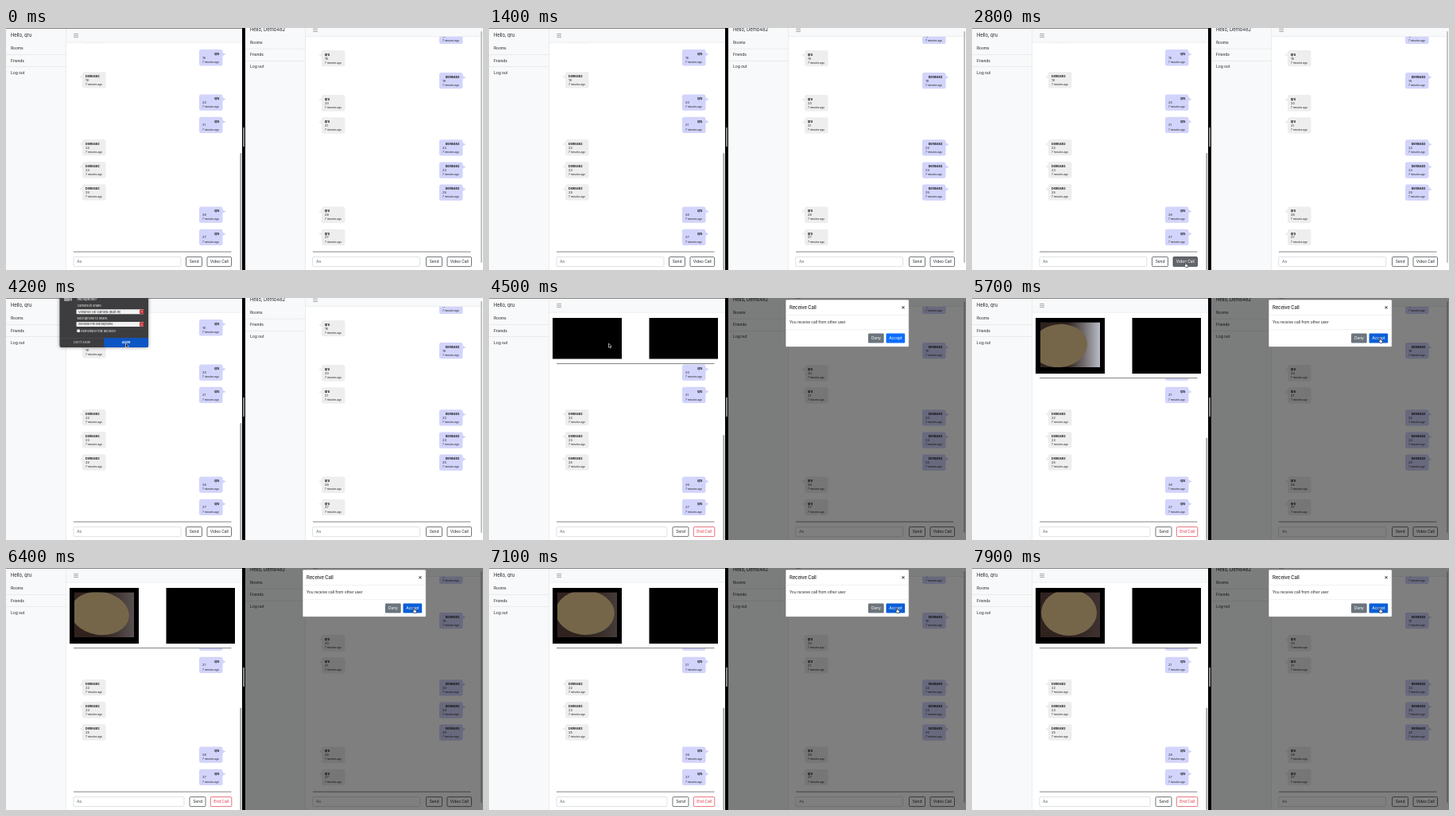
Recreate the animation shown at these times as an HTML page with a canvas. Size 600x304 px, loop 8000 ms.

```html
<!DOCTYPE html>
<html lang="en">
<head>
<meta charset="utf-8">
<title>Chat video call</title>
<style>
  html, body { margin: 0; width: 100%; height: 100%; overflow: hidden; background: #fff; }
  canvas { display: block; width: 100vw; height: 100vh; }
</style>
</head>
<body>
<canvas id="stage"></canvas>
<script>
const W = 600, H = 304, LOOP = 8000;
const HOST = 'qru', GUEST = 'Demo482';
const stage = document.getElementById('stage');
const ratio = window.devicePixelRatio || 1;
stage.width = W * ratio;
stage.height = H * ratio;
const ctx = stage.getContext('2d');

// Each message: sender and text, oldest first
const messages = [
  [GUEST, '17'], [HOST, '18'], [GUEST, '19'], [HOST, '20'], [HOST, '21'],
  [GUEST, '22'], [GUEST, '23'], [GUEST, '25'], [HOST, '26'], [HOST, '27']
];

// Keyframes: time, then values
const cursorPath = [
  [2380, 276, 303], [2600, 268, 294.5], [3500, 268, 294.5],
  [4000, 150.5, 57], [4650, 150.5, 57], [5400, 512.5, 50.5]
];
// Centre, radii and tilt of the shape on camera, then brightness of the right side
const cameraPath = [
  [4800, 108, 60, 34, 28, -.2, .9], [5700, 110, 60, 35, 27, -.12, 1],
  [6400, 118, 57, 37, 27, .15, .3], [7200, 121, 56, 37, 28, .05, .15],
  [7900, 122, 56, 35, 29, 0, .1]
];

const clamp = v => Math.max(0, Math.min(1, v));
const ease = v => v * v * (3 - 2 * v);

function sample(keys, t) {
  let i = 0;
  while (i < keys.length - 2 && t > keys[i + 1][0]) i++;
  const [a, b] = [keys[i], keys[i + 1]];
  const p = ease(clamp((t - a[0]) / (b[0] - a[0])));
  return a.slice(1).map((v, k) => v + (b[k + 1] - v) * p);
}

function rect(x, y, w, h, fill) {
  ctx.fillStyle = fill;
  ctx.fillRect(x, y, w, h);
}

function box(x, y, w, h, r, fill, stroke) {
  ctx.beginPath();
  ctx.roundRect(x, y, w, h, r);
  if (fill) { ctx.fillStyle = fill; ctx.fill(); }
  if (stroke) { ctx.strokeStyle = stroke; ctx.lineWidth = .7; ctx.stroke(); }
}

function polygon(points, fill, stroke) {
  ctx.beginPath();
  points.forEach(([x, y]) => ctx.lineTo(x, y));
  ctx.closePath();
  ctx.fillStyle = fill;
  ctx.fill();
  if (stroke) { ctx.strokeStyle = stroke; ctx.lineWidth = .6; ctx.stroke(); }
}

function text(str, x, y, size = 5, color = '#212529', weight = 400, align = 'left') {
  ctx.font = `${weight} ${size}px Inter, "Liberation Sans", sans-serif`;
  ctx.letterSpacing = -size * .02 + 'px';
  ctx.textAlign = align;
  ctx.textBaseline = 'middle';
  ctx.fillStyle = color;
  ctx.fillText(str, x, y);
}

function button(label, x, y, w, h, fill, stroke, color) {
  box(x, y, w, h, 1.2, fill, stroke);
  text(label, x + w / 2, y + h / 2 + .1, 5, color, 400, 'center');
}

function clipped(x, y, w, h, paint) {
  ctx.save();
  ctx.beginPath();
  ctx.rect(x, y, w, h);
  ctx.clip();
  paint();
  ctx.restore();
}

function bubble(x, y, own, sender, body) {
  const fill = own ? '#d2d4fb' : '#eeeeee';
  const edge = own ? x + 29 : x + .5, tip = own ? x + 33.5 : x - 4;
  polygon([[edge, y + 3.5], [tip, y + 6], [edge, y + 8.5]], fill);
  box(x, y, 29.5, 20.3, 2.5, fill);
  text(sender, own ? x + 25.2 : x + 4, y + 5.7, 3.75, '#111', 700, own ? 'right' : 'left');
  text(body, x + 4, y + 10.5, 4.1, '#333');
  text('7 minutes ago', x + 4, y + 15.9, 3.3, '#222');
}

// One browser window; up is how far its page is scrolled
function pane({ x, width, user, up, step, clipTop, call, hover }) {
  const main = x + 75.5;
  rect(x, 0, width, H, '#fff');
  rect(x, 0, 75.5, H, '#f8f9fa');
  rect(main, 0, width - 75.5, 18 - up, '#f8f9fa');
  rect(main, 17.8 - up, width - 75.5, .6, '#e2e4e6');
  rect(main - .4, 0, .6, H, '#e0e2e4');
  text('Hello, ' + user, x + 6, 9.5 - up, 6);
  ['Rooms', 'Friends', 'Log out'].forEach((label, i) => {
    text(label, x + 6, 25.8 + i * 15.2 - up, 5);
    if (i < 2) rect(x, 33.2 + i * 15.2 - up, 75.5, .6, '#dfe1e3');
  });
  for (let i = 0; i < 3; i++) rect(x + 85.2, 7.2 + i * 2.1 - up, 5.8, .6, '#777');

  clipped(main, clipTop, width - 76, 280.5 - clipTop, () => {
    messages.forEach(([sender, body], i) => {
      const own = sender === user;
      const y = 252.7 - (messages.length - 1 - i) * step;
      bubble(x + (own ? 243 : 96) + (x && own ? 1 : 0), y, own, sender, body);
    });
  });

  const shift = x ? 1 : 0;
  rect(x + 85, 280.7, 198.5, .8, '#666');
  box(x + 85 - shift / 3, 287.6, call ? 139 : 135, 12, 1.3, '#fff', '#ced4da');
  text('Aa', x + 89, 293.8, 5, '#6c757d');
  const left = x + shift;
  button('Send', left + (call ? 231 : 226.5), 287.6, 20, 12, '#fff', '#343a40', '#212529');
  if (call) {
    button('End Call', left + 257.3, 287.6, 26.5, 12, '#fff', '#dc3545', '#dc3545');
  } else {
    const [r, g, b] = [98, 101, 106].map(v => Math.round(255 + (v - 255) * hover));
    button('Video Call', left + 253, 287.6, 30.5, 12, `rgb(${r},${g},${b})`, '#343a40', hover > .5 ? '#fff' : '#212529');
  }
}

function cameraPicture(t) {
  const [cx, cy, rx, ry, tilt, light] = sample(cameraPath, t);
  clipped(86, 30.5, 75, 56.5, () => {
    rect(86, 30.5, 75, 56.5, '#30231f');
    const glow = ctx.createLinearGradient(120, 0, 161, 0);
    glow.addColorStop(0, '#30231f');
    glow.addColorStop(.5, '#716a6c');
    glow.addColorStop(1, '#b9bdc9');
    ctx.globalAlpha = light;
    rect(86, 30.5, 75, 56.5, glow);
    ctx.globalAlpha = 1;
    ctx.beginPath();
    ctx.ellipse(cx, cy, rx, ry, tilt, 0, Math.PI * 2);
    ctx.fillStyle = '#75664a';
    ctx.fill();
  });
}

function videos(t) {
  const live = t >= 4800, height = live ? 70 : 51.5;
  rect(80, 25, 87, height, '#000');
  rect(201.5, 25, 86.5, height, '#000');
  rect(85, live ? 100 : 82, 198.5, .8, '#666');
  if (live) cameraPicture(t);
}

function selectBox(label, y) {
  box(88.5, y, 84.5, 6, 1, '#f1f1f1');
  text(label, 91, y + 3.1, 3.9, '#222');
  box(168, y + .3, 5, 5.4, 1, '#c9343d');
  text('⌄', 170.5, y + 2.4, 4, '#fff', 700, 'center');
}

function permissionDialog(t) {
  ctx.save();
  ctx.translate(0, -28 * (1 - clamp((t - 3200) / 200)));
  ctx.shadowColor = 'rgba(0,0,0,.45)';
  ctx.shadowBlur = 4 * ratio;
  box(67.5, -40, 111.5, 102, 2, '#3d3d3f');
  ctx.shadowColor = 'transparent';
  box(73, -2, 7, 6, 1, '#9b9b9d');
  polygon([[80, 1], [83, -1], [83, 4], [80, 2.5]], '#9b9b9d');
  text('microphone?', 89.5, 2, 4.2, '#eee', 500);
  text('Camera to share:', 89.5, 10, 4, '#eee');
  selectBox('Vorluneo HD Camera (Built-in)', 14.3);
  text('Microphone to share:', 89.5, 25.8, 4, '#eee');
  selectBox('Zelnook Pro Microphone', 30);
  box(89.3, 39.5, 3.6, 3.6, .6, '#f3f3f3');
  text('Remember this decision', 94.3, 41.4, 4, '#eee');
  rect(67.5, 50, 111.5, .5, '#555');
  box(123.3, 50.3, 55.7, 11.7, [0, 0, 2, 0], '#0b55c4');
  text("Don't Allow", 95.5, 56.2, 4.1, '#d5d5d5', 400, 'center');
  text('Allow', 151, 56.2, 4.1, '#fff', 600, 'center');
  ctx.restore();
}

function callModal(hovered) {
  rect(301, 0, 299, H, 'rgba(0,0,0,.5)');
  box(373, 2, 155.3, 59.5, 1.5, '#fff', '#777');
  text('Receive Call', 378, 12, 6, '#212529', 500);
  text('×', 521, 11.8, 7.5, '#444', 600, 'center');
  rect(373, 21, 155.3, .5, '#dee2e6');
  text('You receive call from other user', 378, 30.6, 4.9);
  rect(373, 39.6, 155.3, .5, '#dee2e6');
  button('Deny', 477, 44.6, 19.7, 11.8, '#6c757d', null, '#fff');
  button('Accept', 499.5, 44.6, 23.7, 11.8, hovered ? '#0b5ed7' : '#0d6efd', null, '#fff');
}

function cursor(x, y, hand) {
  const shape = hand
    ? [[0, 0], [1.2, 0], [1.3, 2.2], [4, 3], [3.6, 6], [.8, 6], [-1.3, 3.5], [-.6, 3], [0, 3.6]]
    : [[0, 0], [3.6, 3.7], [2.2, 3.8], [3, 5.6], [2, 6], [1.2, 4.2], [0, 5.2]];
  polygon(shape.map(([dx, dy]) => [x + dx, y + dy]), hand ? '#fff' : '#000', hand ? '#111' : '#fff');
}

function render(t) {
  ctx.setTransform(stage.width / W, 0, 0, stage.height / H, 0, 0);
  const call = t >= 4500;
  const [mouseX, mouseY] = sample(cursorPath, t);
  const overCall = t >= 2550 && t < 3560;
  const overAccept = mouseX >= 499.5 && mouseY < 57;

  pane({
    x: 0, width: 297, user: HOST, up: 0, step: 28.2, call,
    clipTop: t >= 4800 ? 101 : call ? 83 : 18.5,
    hover: overCall ? clamp((t - 2520) / 150) : 0
  });
  if (call) videos(t);
  rect(0, 0, 297, .7, '#555');
  const thumb = t >= 4800 ? 175.5 : call ? 172 : 157;
  box(294.3, thumb, 2, H - thumb, 1, '#a5a5a5');

  pane({ x: 301, width: 299, user: GUEST, up: 7.4, step: 28.1, clipTop: 11, call: false, hover: 0 });
  box(597, 4, 2, 291, 1, '#c3c3c3');
  if (call) callModal(overAccept);

  rect(297, 0, 4, H, '#000');
  box(298.4, 125, 1.3, 24, .6, '#ddd');
  if (t >= 3300 && t < 4500) permissionDialog(t);
  if (t >= 2380) cursor(mouseX, mouseY, overCall || overAccept);
}

function tick(now) {
  render(now % LOOP);
  requestAnimationFrame(tick);
}
requestAnimationFrame(tick);
</script>
</body>
</html>
```
